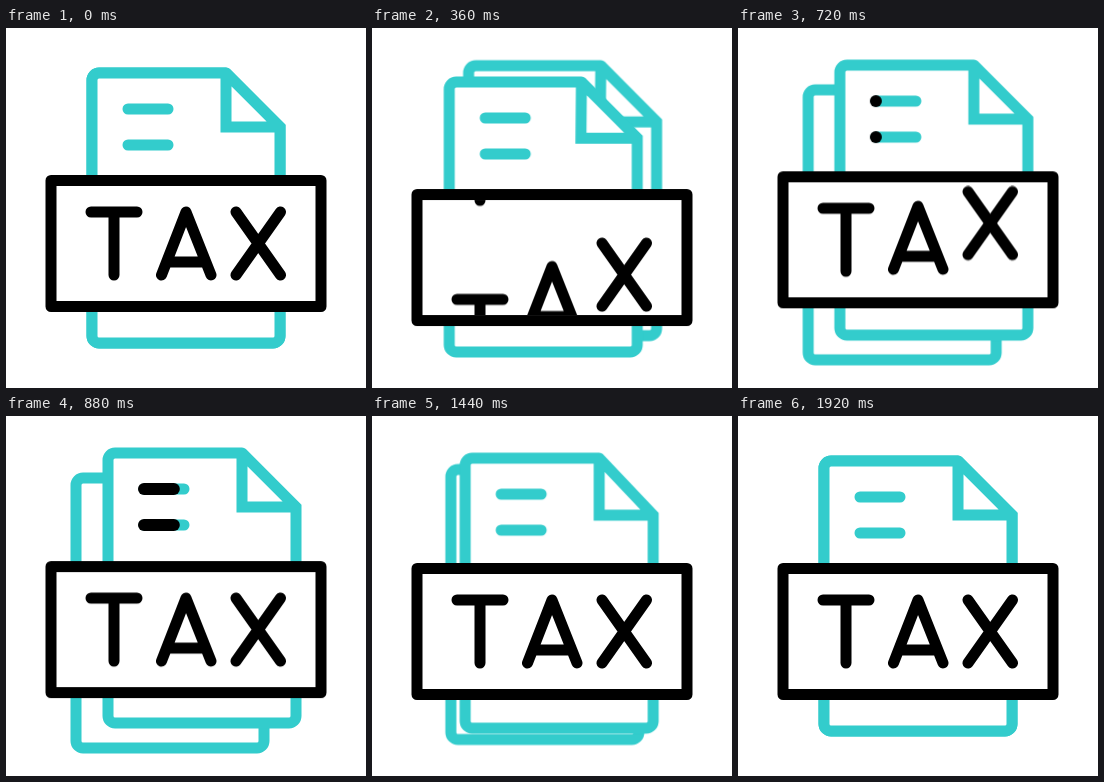
Animation, 360 px wide and 360 px high, one loop 2000 ms. Source, as an HTML page:

```html
<!DOCTYPE html>
<html lang="en">
<head>
<meta charset="utf-8">
<title>Tax document</title>
<style>
  html, body { margin: 0; width: 100%; height: 100%; overflow: hidden; background: #fff; }
  svg { display: block; width: 100vw; height: 100vh; }

  .page, .sheet, .sweep, .label, .letter {
    animation: 2s cubic-bezier(.333, 0, .667, 1) infinite;
  }
  .sheet { fill: #fff; stroke: #33cccc; stroke-width: 11; stroke-miterlimit: 2; stroke-linecap: round; animation-name: fold; }
  .lines { fill: none; stroke: #33cccc; stroke-width: 11; stroke-linecap: round; }
  .sweep { fill: none; stroke: #000; stroke-width: 12; stroke-linecap: round; stroke-dasharray: 42 100; animation-name: sweep; }
  .back { animation-name: back; }
  .front { animation-name: front; }
  .label { animation-name: label; }
  .box { stroke: #000; stroke-width: 11; stroke-linejoin: round; }
  .letter { fill: none; stroke: #000; stroke-width: 11; stroke-linecap: round; stroke-linejoin: round; }
  .t { animation-name: roll-t; }
  .a { animation-name: roll-a; }
  .x { animation-name: roll-x; }

  @keyframes front {
    0%, 4%    { transform: translate(0, 0); }
    14%       { transform: translate(-11px, 10.5px); }
    37%, 62%  { transform: translate(16px, -8px); }
    87%       { transform: translate(-9px, 6.5px); }
    96%, 100% { transform: translate(0, 0); }
  }
  @keyframes back {
    0%, 4%    { transform: translate(0, 0); }
    14%       { transform: translate(13px, -9.5px); }
    37%, 62%  { transform: translate(-16px, 17px); }
    87%       { transform: translate(9px, -7px); }
    96%, 100% { transform: translate(0, 0); }
  }
  /* the folded corner lags behind the page */
  @keyframes fold {
    0%, 4%, 36%, 62%, 95%, 100% {
      d: path("M220 45H93A7 7 0 0 0 86 52V308A7 7 0 0 0 93 315H267A7 7 0 0 0 274 308L274 99L220 45L220 99L274 99");
    }
    13% {
      d: path("M215 45H93A7 7 0 0 0 86 52V308A7 7 0 0 0 93 315H267A7 7 0 0 0 274 308L274 105L215 45L213 105L274 105");
    }
    26% {
      d: path("M224.5 45H93A7 7 0 0 0 86 52V308A7 7 0 0 0 93 315H267A7 7 0 0 0 274 308L274 93.5L224.5 45L227 93.5L274 93.5");
    }
    72% {
      d: path("M220 45H93A7 7 0 0 0 86 52V308A7 7 0 0 0 93 315H267A7 7 0 0 0 274 308L274 102L220 45L220 102L274 102");
    }
    83% {
      d: path("M221.5 45H93A7 7 0 0 0 86 52V308A7 7 0 0 0 93 315H267A7 7 0 0 0 274 308L274 97L221.5 45L222 97L274 97");
    }
  }
  @keyframes sweep {
    0%, 36%     { stroke-dashoffset: 42; }
    48.5%       { stroke-dashoffset: 0; }
    60.5%, 100% { stroke-dashoffset: -42; }
  }
  @keyframes label {
    0%, 4%    { transform: translateY(0); }
    26%       { transform: translateY(20px); }
    38%       { transform: translateY(-5.5px); }
    48%, 100% { transform: translateY(0); }
  }
  @keyframes roll-t {
    0%, 4%    { transform: translateY(0); }
    34%, 100% { transform: translateY(162px); }
  }
  @keyframes roll-a {
    0%, 8.4%  { transform: translateY(0); }
    38%, 100% { transform: translateY(162px); }
  }
  @keyframes roll-x {
    0%, 12%   { transform: translateY(0); }
    42%, 100% { transform: translateY(162px); }
  }
</style>
</head>
<body>
<svg viewBox="0 0 360 360" role="img" aria-label="TAX">
  <defs>
    <clipPath id="window"><rect x="45" y="158" width="270" height="115"/></clipPath>
    <path id="T" d="M85 184H131M108 184V247"/>
    <path id="A" d="M155.5 247L180 184L205 247M161 234H199"/>
    <path id="X" d="M230 184L274.5 247M274.5 184L230 247"/>
  </defs>

  <g class="page back">
    <path class="sheet" d="M220 45H93A7 7 0 0 0 86 52V308A7 7 0 0 0 93 315H267A7 7 0 0 0 274 308L274 99L220 45L220 99L274 99"/>
  </g>
  <g class="page front">
    <path class="sheet" d="M220 45H93A7 7 0 0 0 86 52V308A7 7 0 0 0 93 315H267A7 7 0 0 0 274 308L274 99L220 45L220 99L274 99"/>
    <path class="lines" d="M122 81H162M122 117H162"/>
    <path class="sweep" d="M122 81H162.5"/>
    <path class="sweep" d="M122 117H162.5"/>
  </g>

  <g class="label">
    <rect x="45" y="152.5" width="270" height="126" fill="#fff"/>
    <!-- each letter has a twin above that rolls into its place -->
    <g clip-path="url(#window)">
      <g class="letter t"><use href="#T"/><use href="#T" y="-162"/></g>
      <g class="letter a"><use href="#A"/><use href="#A" y="-162"/></g>
      <g class="letter x"><use href="#X"/><use href="#X" y="-162"/></g>
    </g>
    <rect class="box" x="45" y="152.5" width="270" height="126" fill="none"/>
  </g>
</svg>
</body>
</html>
```
